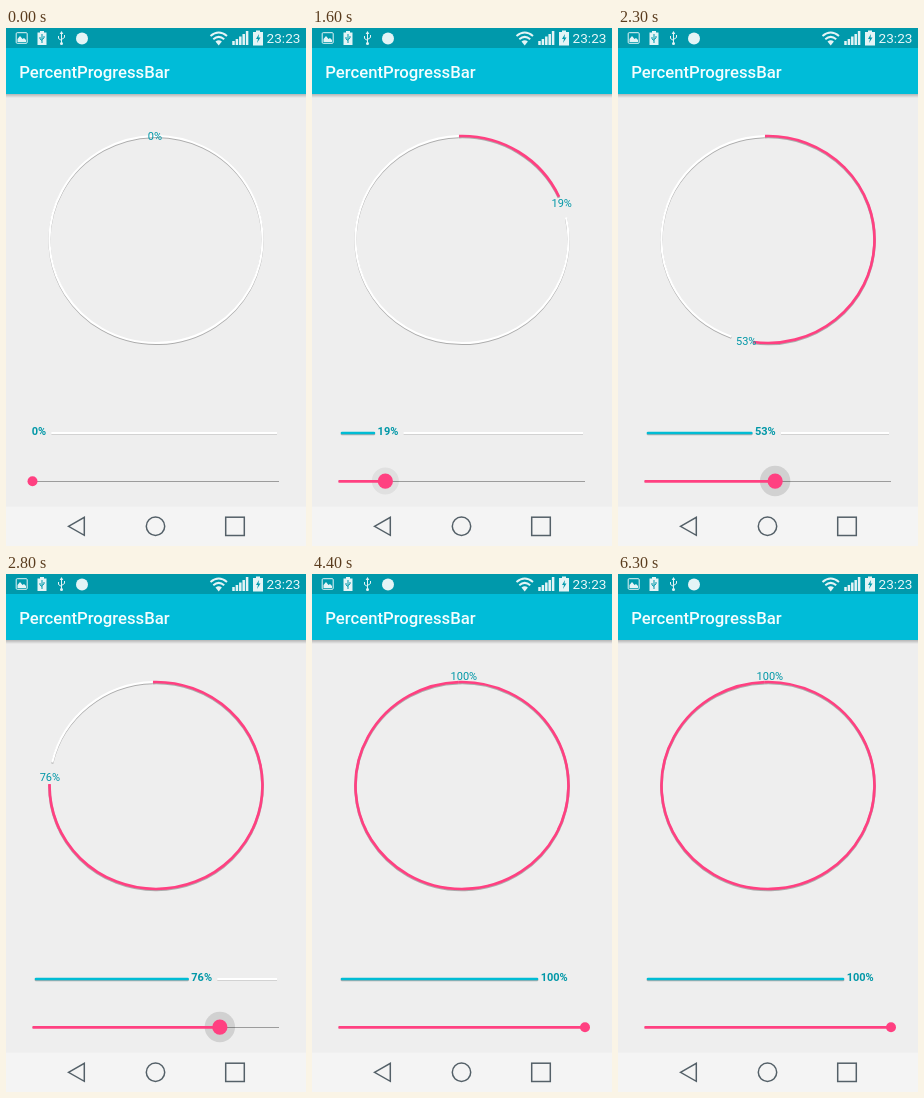
Animation of 300 by 518 pixels, one loop 6400 ms. Source, as an HTML page:

```html
<!DOCTYPE html>
<html lang="en">
<head>
<meta charset="utf-8">
<title>PercentProgressBar</title>
<style>
html, body { margin: 0; width: 100%; height: 100%; overflow: hidden; background: #eee; }
svg { display: block; width: 100vw; height: 100vh; font-family: Roboto, sans-serif; }
.icon { fill: #e4f4f6; }
.line { fill: none; stroke: #e4f4f6; }
.nav { fill: none; stroke: #546068; stroke-width: 1.5; }
.label { font-size: 11px; fill: #0097a7; }
.stroke { fill: none; }
.cast { filter: drop-shadow(0 1px .7px rgba(0, 0, 0, .28)); }
</style>
</head>
<body>
<svg viewBox="0 0 300 518">
  <defs>
    <linearGradient id="shade" x2="0" y2="1">
      <stop stop-color="#000" stop-opacity=".24"/>
      <stop offset="1" stop-color="#000" stop-opacity="0"/>
    </linearGradient>
  </defs>
  <rect width="300" height="518" fill="#eee"/>
  <rect y="66" width="300" height="4" fill="url(#shade)"/>
  <rect width="300" height="66" fill="#00bcd8"/>
  <rect width="300" height="20" fill="#0099ab"/>
  <text x="13.3" y="49.5" font-size="16.7" font-weight="500" fill="#f4fdfe">PercentProgressBar</text>

  <!-- status bar -->
  <rect class="line" x="10.2" y="4.7" width="11" height="10.6" rx="1"/>
  <path class="icon" d="M11.5 14v-3l2.5-3 2.5 3 1.5-1 2 2v2z"/>
  <path class="icon" d="M34 3h4v1.5h2.5V17h-9V4.500H34z"/>
  <path d="M36 6v9M34 9v2l2 1.500M38 8v2l-2 1.500" fill="none" stroke="#0099ab"/>
  <path class="line" d="M55.500 4v11M52.500 8v2.500l3 2M58.500 7v2.500l-3 2"/>
  <path class="icon" d="M53.700 6l1.800-3 1.800 3z"/>
  <circle class="icon" cx="55.500" cy="15.500" r="1.500"/>
  <circle class="icon" cx="76" cy="10.500" r="6"/>
  <path class="line" stroke-width="2" d="M204.500 8Q212.700 1 221 8M207.300 11.200Q212.700 6.500 218.200 11.200"/>
  <path class="icon" d="M209.500 13.500q3.200-2.500 6.400 0l-3.200 4z"/>
  <path class="line" stroke-width="2.500" d="M227.500 17v-4M230.900 17v-6M234.300 17v-8.500M237.700 17v-11M241.100 17V3"/>
  <path class="icon" d="M250 2.500h4V4h3v13.500h-10V4h3z"/>
  <path d="M253 6l-3 5h2l-1 4 3.500-5.500h-2z" fill="#0099ab"/>
  <text x="260.600" y="15.300" font-size="13.600" fill="#e8f7f9">23:23</text>

  <!-- circular bar -->
  <path id="ringTrack" class="stroke cast" stroke="#fff" stroke-width="2.200"/>
  <path id="ring" class="stroke cast" stroke="#ff4081" stroke-width="2.700"/>
  <text id="ringLabel" class="label"></text>

  <!-- straight bar -->
  <path id="barTrack" class="stroke" stroke-width="2" stroke="#fff"/>
  <path id="barShadow" class="stroke" stroke="#d2d2d2"/>
  <path id="bar" class="stroke cast" stroke="#00bcd4" stroke-width="2.700" stroke-linecap="round"/>
  <text id="barLabel" class="label" y="407.300" font-weight="700"></text>

  <!-- slider -->
  <path d="M26.500 453.500H273" stroke="#9c9c9c"/>
  <circle id="halo" cy="453" fill="#000"/>
  <path id="slide" class="stroke" stroke="#ff4081" stroke-width="2.700"/>
  <circle id="thumb" cy="453.200" fill="#ff4081"/>

  <!-- navigation -->
  <rect y="478.500" width="300" height="39.500" fill="#f4f4f4"/>
  <path class="nav" d="M62.500 498.300L78.300 489.300V507.300z"/>
  <circle class="nav" cx="149.500" cy="498.300" r="9.200"/>
  <rect class="nav" x="219.700" y="489.200" width="18.600" height="18.300"/>
</svg>
<script>
const LOOP = 6400, STEP = 100;
const START = -1.6; // ring start angle, degrees clockwise from the top
const drag = [[0, 0], [1100, 0], [1200, 6], [1600, 19], [2300, 53], [3200, 94], [3400, 100], [LOOP, 100]];
const el = id => document.getElementById(id);
const set = (id, attrs) => {
  for (const k in attrs) el(id).setAttribute(k, attrs[k]);
};
const ramp = (t, a, b) => Math.min(1, Math.max(0, (t - a) / (b - a)));

function percent(t) {
  const i = drag.findIndex(k => k[0] > t);
  const [t0, p0] = drag[i - 1], [t1, p1] = drag[i];
  return Math.round(p0 + (p1 - p0) * ramp(t, t0, t1));
}

function ringPoint(deg) {
  const a = deg * Math.PI / 180;
  return [150 + 106.5 * Math.sin(a), 211.5 - 103.5 * Math.cos(a)];
}

function arc(from, to) {
  if (to <= from) return "";
  const big = to - from > 180 ? 1 : 0;
  return `M${ringPoint(from)}A106.5 103.5 0 ${big} 1 ${ringPoint(to)}`;
}

function draw(t) {
  const p = percent(t), text = p + "%", deg = p * 3.6, full = p === 100;

  set("ringTrack", { d: arc(p ? deg + 9.3 : START, START + 359.9) });
  set("ring", { d: p ? arc(START, full ? START + 359.9 : deg - 2.8) : "" });
  const label = el("ringLabel");
  label.textContent = text;
  const [x, y] = ringPoint(deg + 1);
  const left = x - Math.max(10, label.getComputedTextLength() / 2);
  set("ringLabel", { x: left, y: full ? 106 : y + 4 });

  const end = Math.min(226, 23 + 2.1 * p);
  el("barLabel").textContent = text;
  set("barLabel", { x: end + 2.7 });
  const rest = end + 8 + el("barLabel").getComputedTextLength();
  set("bar", { d: end > 30 ? `M30 405H${end - 1}` : "" });
  set("barTrack", { d: full || rest > 270 ? "" : `M${rest} 405H271` });
  set("barShadow", { d: full || rest > 270 ? "" : `M${rest} 406.5H271` });

  const knob = 26.5 + 2.465 * p;
  const release = 1 - ramp(t, 3700, 4000);
  const press = ramp(t, 1200, 1500) * release;
  set("slide", { d: `M26.5 453.3H${knob}` });
  set("thumb", { cx: knob, r: 5 + 2.6 * press });
  set("halo", {
    cx: knob,
    r: 15.2 * ramp(t, 1200, 1650),
    opacity: .12 * ramp(t, 1200, 2000) * release
  });
}

function tick(now) {
  draw(Math.floor(now % LOOP / STEP) * STEP);
  requestAnimationFrame(tick);
}
draw(0);
requestAnimationFrame(tick);
</script>
</body>
</html>
```
